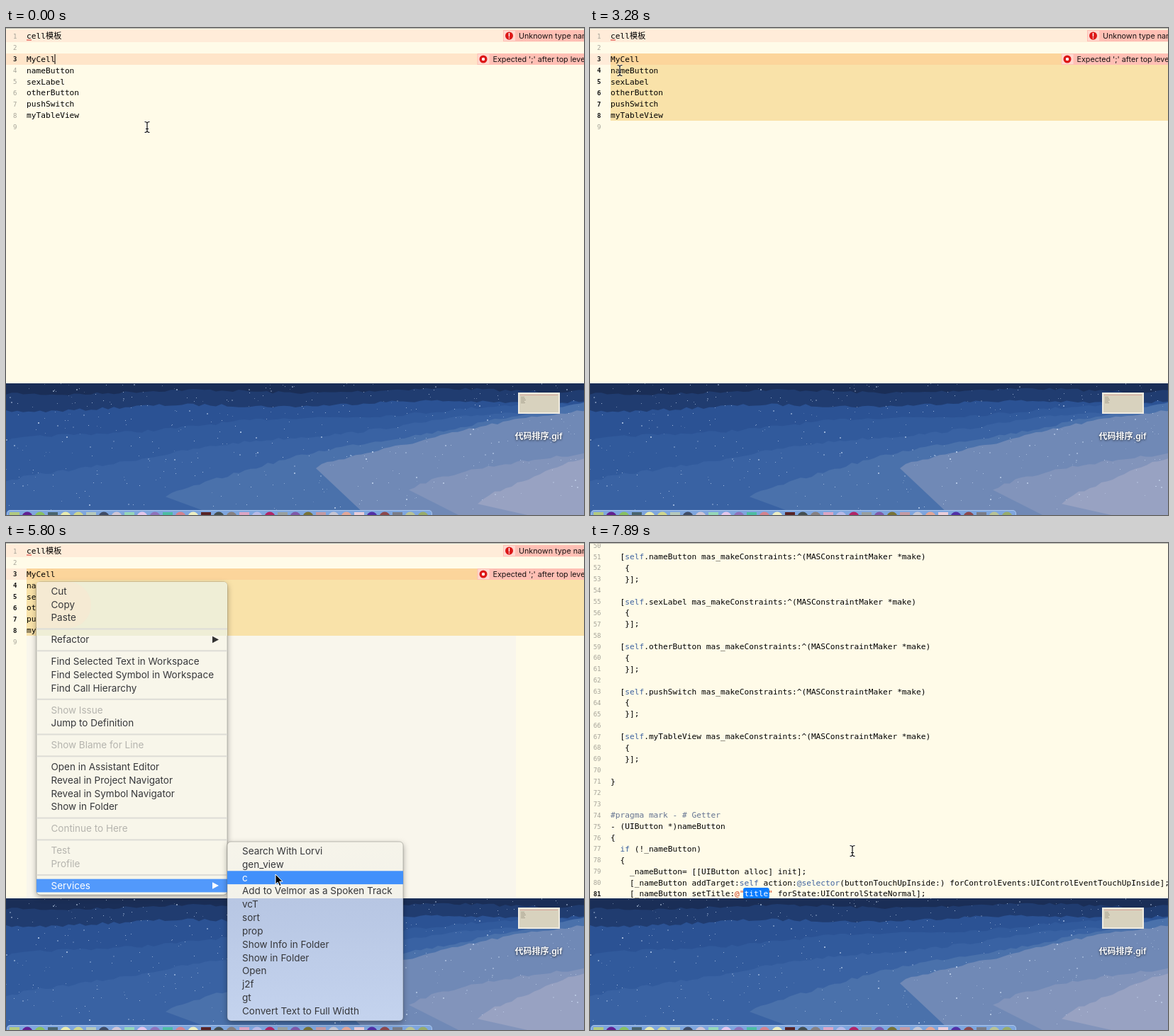
An HTML page with a canvas for the animation above (8000 ms loop, 815 by 688 pixels).

```html
<!DOCTYPE html>
<html lang="en">
<head>
<meta charset="utf-8">
<title>Editor services menu</title>
<style>
html, body { margin: 0; width: 100%; height: 100%; overflow: hidden; background: #fffbe8; }
canvas { display: block; }
</style>
</head>
<body>
<canvas id="stage" width="815" height="688"></canvas>
<script>
const W = 815, H = 688, LOOP = 8000, BEAT = 148.85;
const EDITOR_END = 502, GUTTER = 29, LINE = 15.88;
const stage = document.getElementById('stage');
const newLayer = () => Object.assign(document.createElement('canvas'), { width: W, height: H });
const desktop = newLayer(), menuLayer = newLayer();
let ctx;

const MONO = '"DejaVu Sans Mono", "Noto Sans CJK SC", "Noto Sans CJK", monospace';
const SANS = 'Inter, "Noto Sans CJK SC", "Noto Sans CJK", sans-serif';
const CODE = '11.2px ' + MONO, MENU = '13.5px ' + SANS;

function paintOn(canvas, paint) {
  const previous = ctx;
  ctx = canvas.getContext('2d');
  paint();
  ctx = previous;
}
const rect = (color, x, y, w, h) => { ctx.fillStyle = color; ctx.fillRect(x, y, w, h); };
function text(str, x, y, font, color, align = 'left') {
  ctx.font = font; ctx.fillStyle = color; ctx.textAlign = align;
  ctx.fillText(str, x, y);
}
function shape(points, color) {
  ctx.beginPath();
  points.forEach(([x, y]) => ctx.lineTo(x, y));
  ctx.closePath();
  ctx.fillStyle = color; ctx.fill();
}
function disc(x, y, r, color) {
  ctx.beginPath(); ctx.arc(x, y, r, 0, 7);
  ctx.fillStyle = color; ctx.fill();
}
function rounded(x, y, w, h, r, color) {
  ctx.beginPath(); ctx.roundRect(x, y, w, h, r);
  ctx.fillStyle = color; ctx.fill();
}
function withShadow(alpha, blur, dy, paint) {
  ctx.save();
  ctx.shadowColor = `rgba(0,0,0,${alpha})`; ctx.shadowBlur = blur; ctx.shadowOffsetY = dy;
  paint();
  ctx.restore();
}

// ---------- desktop, painted once ----------
let seed = 7;
const random = () => (seed = (seed * 16807) % 2147483647) / 2147483647;

// A haze layer: a wavy, ragged edge from (left, y0) to the right side at y1, filled below.
function haze(color, left, y0, y1) {
  const edge = [], phase = random() * 6;
  for (let x = left; x < W + 8; x += 8) {
    const u = (x - left) / (W - left);
    const wave = Math.sin(x / 55 + phase) * 2.5 + (random() - .5) * 4;
    edge.push([x, y0 + (y1 - y0) * u ** .75 + wave]);
  }
  shape([...edge, [W, H], [left && left + 70, H]], color);
}

function paintDesktop() {
  rect('#1a2e57', 0, EDITOR_END, W, H - EDITOR_END);
  haze('#203c70', 0, 516, 511);
  haze('#2b5294', 0, 541, 526);
  haze('#315a9c', 0, 586, 530);
  haze('#3962a3', 0, 644, 534);
  haze('#4a71ab', 225, 662, 532);
  haze('#7089b6', 437, 622, 540);
  haze('#8294bb', 568, 652, 598);
  haze('#98a2c2', 665, 670, 608);

  for (let i = 0; i < 420; i++) {
    const x = random() * W | 0, y = EDITOR_END + random() ** 1.25 * 180 | 0;
    const size = random() < .12 ? 2 : 1;
    rect(`rgba(205,222,245,${.2 + random() * .55})`, x, y, size, size);
  }

  // File on the desktop
  rect('#efebe0', 722, 515, 59, 30);
  rect('#d8d2be', 724, 517, 55, 26);
  rect('#d9a79b', 725, 518, 53, 1);
  for (let i = 0; i < 5; i++) rect('#aaa491', 726, 521 + i * 2, 5 + i % 3, 1);
  withShadow(.7, 3, 1, () => text('代码排序.gif', 751, 581, '600 12px ' + SANS, '#fff', 'center'));

  // Dock
  rounded(1, 681, 600, 20, 5, '#a9c6ee');
  rounded(2, 682, 598, 20, 4, '#7fa6de');
  for (let i = 0; i < 33; i++) {
    const x = 12 + i * 18, color = `hsl(${random() * 360},${random() * 70}%,${20 + random() * 70}%)`;
    i % 3 ? disc(x, 691, 7.5, color) : rect(color, x - 7, 684, 14, 4);
  }
}

// ---------- pointer ----------
// [first beat, last beat, x, y]: a straight move to x, y, stepped once per beat
const moves = [
  [0, 7, 128, 133], [10, 11, 125, 131], [11, 14, 17, 80], [15, 17, 16, 54], [17, 20, 18, 43],
  [21, 22, 42, 60], [25, 26, 42, 54], [27, 29, 115, 486], [29, 30, 121, 500],
  [30, 35, 213, 472], [35, 39, 380, 468], [52, 53, 370, 435]
];
function pointerAt(beat) {
  let x = 199, y = 140;
  for (const [from, to, nextX, nextY] of moves) {
    const u = Math.max(0, Math.min(1, (beat - from) / (to - from)));
    x += (nextX - x) * u;
    y += (nextY - y) * u;
  }
  return [Math.round(x), Math.round(y)];
}

function drawBeam(x, y) {
  ctx.beginPath();
  for (const side of [-1, 1]) {
    ctx.moveTo(x - 3.5, y + side * 7.5);
    ctx.quadraticCurveTo(x, y + side * 7.5, x, y + side * 5);
    ctx.quadraticCurveTo(x, y + side * 7.5, x + 3.5, y + side * 7.5);
  }
  ctx.moveTo(x, y - 6); ctx.lineTo(x, y + 6);
  ctx.moveTo(x - 2, y + 2.5); ctx.lineTo(x + 2, y + 2.5);
  ctx.strokeStyle = 'rgba(255,255,255,.8)'; ctx.lineWidth = 2.6; ctx.stroke();
  ctx.strokeStyle = '#111'; ctx.lineWidth = 1.2; ctx.stroke();
}
function drawArrow(x, y) {
  const outline = [[0, 0], [0, 14], [3.2, 11.2], [5.6, 16.6], [8, 15.6], [5.7, 10.3], [10, 10.2]];
  shape(outline.map(([dx, dy]) => [x + dx, y + dy]), '#000');
  ctx.strokeStyle = '#fff'; ctx.lineWidth = 1; ctx.stroke();
}

// ---------- editor ----------
const names = ['nameButton', 'sexLabel', 'otherButton', 'pushSwitch', 'myTableView'];
const listing = ['cell模板', '', 'MyCell', ...names, ''];
const rowTop = n => Math.round(36 + (n - 3) * LINE);

function lineNumber(n, y, active) {
  text(n, 15.5, y - .5, (active ? '700' : '400') + ' 9px ' + MONO, active ? '#111' : '#a5a398', 'right');
}
function issue(x, y, message, mark) {
  rect('#ffbfb4', x, y, W - x, 16);
  rect('#ffd9d0', x + 1, y + 1, 16, 14);
  disc(x + 8.5, y + 8, 5.5, '#dd1717');
  if (mark) text(mark, x + 8.5, y + 12, '700 10px ' + SANS, '#fff', 'center');
  else disc(x + 8.5, y + 8, 2.2, '#fff');
  text(message, x + 22, y + 12, '10.75px ' + SANS, '#171313');
}

function drawListing(beat, pointerY) {
  const selecting = beat >= 12;
  const first = !selecting ? 9 : beat >= 18 ? 3 : Math.floor((pointerY - 52) / LINE) + 4;
  rect('#ffecd9', 0, 2, W, 18);
  rect(selecting ? '#ffecd9' : '#ffe5c9', 0, 36, W, 16);
  if (beat >= 30) {
    const left = beat < 45 ? GUTTER : 575;
    rect('#f9f6ec', left, 131, 719 - left, EDITOR_END - 131);
  }
  if (selecting) rect('#f9e2a9', GUTTER, rowTop(first), W, 131 - rowTop(first));
  if (first === 3) rect('#fcd59b', GUTTER, 36, W, 16);
  listing.forEach((line, i) => {
    const n = i + 1, y = n === 1 ? 15 : 47.8 + (n - 3) * LINE;
    lineNumber(n, y, selecting ? n >= first && n <= 8 : n === 3);
    text(line, GUTTER, y, CODE, '#000');
  });
  rect('#e0322b', GUTTER, 16.5, 7, 1);
  issue(701, 3, 'Unknown type name', '!');
  issue(664.5, 36, "Expected ';' after top level declarator");
  if (beat < 9 && beat % 6 < 3) rect('#000', 68.5, 37, 1, 14);
}

const generated = [''];
for (const name of names) {
  generated.push(`  [self.${name} mas_makeConstraints:^(MASConstraintMaker *make)`, '   {', '   }];', '');
}
generated.push('}', '', '', '#pragma mark - # Getter', '- (UIButton *)nameButton', '{',
  '  if (!_nameButton)', '  {', '    _nameButton= [[UIButton alloc] init];',
  '    [_nameButton addTarget:self action:@selector(buttonTouchUpInside:) forControlEvents:UIControlEventTouchUpInside];',
  '    [_nameButton setTitle:@"title" forState:UIControlStateNormal];');

function tokenColor(token) {
  if (/^#/.test(token)) return '#647391';
  if (/^(self|if|@selector)$/.test(token)) return '#3f639f';
  if (/"$/.test(token)) return '#d2431f';
  return token === 'title' ? '#fff' : '#000';
}
function drawGenerated() {
  generated.forEach((line, i) => {
    const n = 50 + i, y = 23 + (i - 1) * LINE;
    lineNumber(n, y, n === 81);
    let x = GUTTER;
    for (const token of line.split(/(^#.*|\bself\b|\bif\b|@selector|@"|"|\btitle\b)/)) {
      ctx.font = CODE;
      const width = ctx.measureText(token).width;
      if (token === 'title') rounded(x - 1.5, 487, width + 3, 16, 3, '#0a7cff');
      text(token, x, y, CODE, tokenColor(token));
      x += width;
    }
  });
}

// ---------- menus; '-' is a separator, a leading '~' means disabled ----------
function layout(labels, y, pitch) {
  const items = [];
  let gap = false;
  for (const label of labels) {
    if (label === '-') { y += 12.1; gap = true; continue; }
    items.push({ label: label.replace('~', ''), off: label[0] === '~', y, gap });
    y += pitch; gap = false;
  }
  return items;
}
const mainItems = layout(['Cut', 'Copy', 'Paste', '-', 'Refactor', '-', 'Find Selected Text in Workspace',
  'Find Selected Symbol in Workspace', 'Find Call Hierarchy', '-', '~Show Issue', 'Jump to Definition', '-',
  '~Show Blame for Line', '-', 'Open in Assistant Editor', 'Reveal in Project Navigator',
  'Reveal in Symbol Navigator', 'Show in Folder', '-', '~Continue to Here', '-', '~Test', '~Profile', '-',
  'Services'], 68, 18.78);
const serviceItems = layout(['Search With Lorvi', 'gen_view', 'c', 'Add to Velmor as a Spoken Track', 'vcT', 'sort',
  'prop', 'Show Info in Folder', 'Show in Folder', 'Open', 'j2f', 'gt', 'Convert Text to Full Width'], 435, 18.85);
const services = mainItems.at(-1);

function panel(x, y, w, h, fill) {
  withShadow(.35, 8, 3, () => rounded(x, y, w, h, 5, fill));
  ctx.strokeStyle = 'rgba(90,90,80,.35)'; ctx.lineWidth = 1; ctx.stroke();
}
function drawItems(items, x, w, indent, isHot, hotColor) {
  for (const item of items) {
    const hot = isHot(item), y = item.y;
    if (item.gap) rect('#dddcd6', x, y - 16, w, 2);
    if (hot) rect(hotColor, x, y - 9.4, w, 18.8);
    const color = hot ? '#fff' : item.ghost ? '#eae7dd' : item.off ? '#b5b4ae' : '#36373a';
    text(item.label, x + indent, y + 4.8, MENU, color);
    if (item.label === 'Refactor' || item === services && !item.ghost) {
      shape([[291, y - 4.8], [300, y], [291, y + 4.8]], hot ? '#fff' : '#333');
    }
  }
}

function paintMenus(beat, px, py) {
  const open = beat >= 33;
  const under = item => Math.abs(item.y - py) < 9.4 && !item.off;
  ctx.clearRect(0, 0, W, H);

  panel(43, 55, 269, 442, '#f8f6ea');
  rounded(43, 55, 269, 76, [5, 5, 0, 0], '#efeed6');
  rounded(43, 55, 77, 65, [5, 40, 40, 0], '#f5ead3');
  services.ghost = beat === 30;
  drawItems(mainItems, 43, 269, 20.5,
    item => item === services && beat > 30 || !open && under(item), '#5299fb');

  if (open) {
    const fill = ctx.createLinearGradient(312, 422, 312, 675);
    const edge = (EDITOR_END - 422) / 253;
    fill.addColorStop(0, '#f6f4ea'); fill.addColorStop(edge, '#f3f2ea');
    fill.addColorStop(edge, '#b7c6e3'); fill.addColorStop(1, '#c4d3ee');
    panel(312, 422, 248, 253, fill);
    drawItems(serviceItems, 312, 248, 21, item => px > 312 && under(item), '#4190fb');
  }
}

// ---------- frame ----------
function draw(beat) {
  const [px, py] = pointerAt(beat);
  rect('#fffbe8', 0, 0, W, H);
  if (beat < 49) drawListing(beat, py); else drawGenerated();
  rect('#b5b3ab', 0, 0, W, 1);
  ctx.drawImage(desktop, 0, 0);
  if (beat >= 26 && beat < 45) {
    paintOn(menuLayer, () => paintMenus(beat, px, py));
    ctx.globalAlpha = 1 - Math.max(0, beat - 42) * .1;
    ctx.drawImage(menuLayer, 0, 0);
    ctx.globalAlpha = 1;
  }
  (beat < 26 || beat >= 53 ? drawBeam : drawArrow)(px, py);
}

paintOn(desktop, paintDesktop);
ctx = stage.getContext('2d');
const start = performance.now();
function tick() {
  const time = (performance.now() - start) % LOOP;
  draw(Math.floor((time + 9) / BEAT));
  requestAnimationFrame(tick);
}
tick();
</script>
</body>
</html>
```
